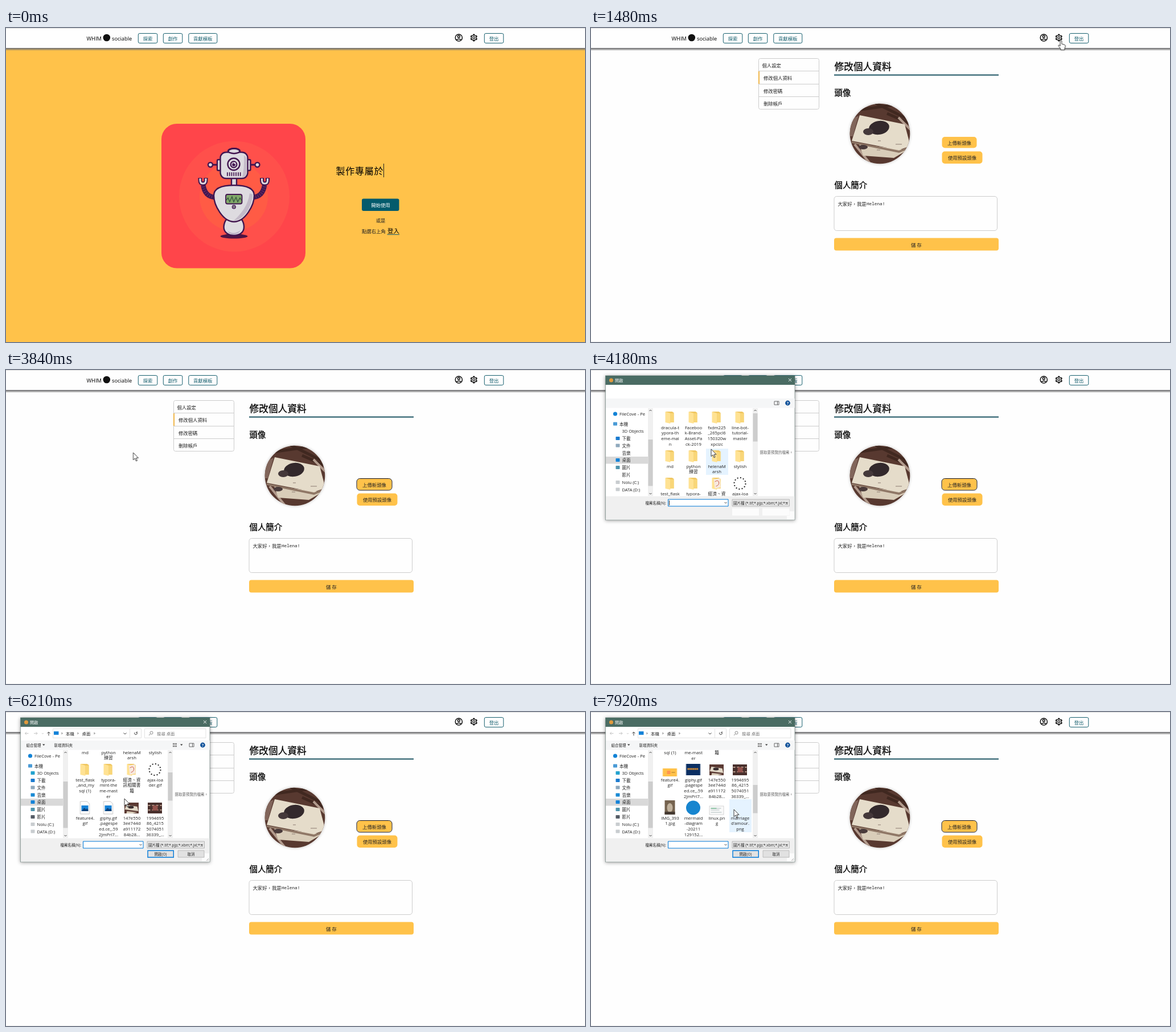
Animation, 1017 px wide and 551 px high, one loop 7990 ms. Source, as an HTML page:

```html
<!DOCTYPE html>
<html lang="zh-Hant">
<head>
<meta charset="utf-8">
<title>Profile settings</title>
<style>
html, body { margin: 0; width: 100%; height: 100%; overflow: hidden; background: #fefefe; }
svg { display: block; width: 100%; height: 100%; }
text { font: 8.4px "Open Sans", "Noto Sans CJK TC", "Noto Sans CJK", sans-serif; dominant-baseline: central; fill: #222; white-space: pre; }
.mid { text-anchor: middle; }
.head, .title { fill: #000; stroke: #000; stroke-width: .3; }
.head { font-size: 14.4px; }
.title { font-size: 16.7px; }
.teal { fill: #17606f; }
.nav rect { fill: none; stroke: #17606f; }
.gold { fill: #ffc24a; }
.line { fill: none; stroke: #ccc; }
.small { font-size: 6.5px; }
.file { font-size: 7.7px; text-anchor: middle; }
.ink { fill: none; stroke: #444; }
.bot { fill: #dedbe0; stroke: #42154f; stroke-width: 2.4; }
.shadow { filter: drop-shadow(0 1px 3px #0006); }

.step { animation: 7.99s step-end infinite; }
.flow { animation: 7.99s linear infinite; }
.home { animation-name: home; }
.card { animation-name: card; }
.settings { animation-name: settings; }
.key1 { animation-name: key1; }
.key2 { animation-name: key2; }
.key3 { animation-name: key3; }
.typing { animation-name: typing; }
.ring { animation-name: ring; }
.click { animation-name: click; mix-blend-mode: multiply; }
.dialog { animation-name: dialog; }
.late { animation-name: late; }
.blink { animation-name: blink; }
.list { animation-name: list; }
.thumb { animation-name: thumb; }
.hover { animation-name: hover; fill: #e5f3ff; }
.generic { animation-name: generic; }
.loaded { animation-name: loaded; }
.pointer { animation-name: pointer; }
.arrow { animation-name: arrow; }
.hand { animation-name: hand; }

@keyframes home { 0% { opacity: 1 } 18.52%, 100% { opacity: 0 } }
@keyframes settings { 0% { opacity: 0 } 18.52%, 100% { opacity: 1 } }
@keyframes card { 0% { fill: #ff454a } 7.75%, 100% { fill: #ff3f4b } }
@keyframes key1 { 0% { fill-opacity: 0 } 2.5%, 100% { fill-opacity: 1 } }
@keyframes key2 { 0% { fill-opacity: 0 } 8.76%, 100% { fill-opacity: 1 } }
@keyframes key3 { 0% { fill-opacity: 0 } 15.14%, 100% { fill-opacity: 1 } }
@keyframes typing {
  0% { transform: none; opacity: 1 }
  2.5% { transform: translateX(16.75px); opacity: 1 }
  5.88% { transform: translateX(16.75px); opacity: 0 }
  10.88% { transform: translateX(33.5px); opacity: 1 }
  15.14% { transform: translateX(50.25px); opacity: 1 }
  16.77%, 100% { opacity: 0 }
}
@keyframes click { 0% { opacity: 0 } 15.14% { opacity: 1 } 18.52%, 100% { opacity: 0 } }
@keyframes ring { 0% { opacity: 0 } 33.91%, 100% { opacity: 1 } }
@keyframes dialog { 0%, 49.8% { opacity: 0 } 51.5%, 100% { opacity: 1 } }
@keyframes late { 0% { opacity: 0 } 53.2%, 100% { opacity: 1 } }
@keyframes blink {
  0% { opacity: 0 } 52.31% { opacity: 1 } 58.94% { opacity: 0 } 65.7% { opacity: 1 } 72.59% { opacity: 0 }
  79.09% { opacity: 1 } 85.73% { opacity: 0 } 92.61% { opacity: 1 } 99.12%, 100% { opacity: 0 }
}
@keyframes list {
  0% { transform: none } 68.46% { transform: translateY(-32px) }
  77.72% { transform: translateY(-98px) } 95.11%, 100% { transform: translateY(-165px) }
}
@keyframes thumb {
  0% { transform: none } 68.46% { transform: translateY(10px) }
  77.72% { transform: translateY(30px) } 95.11%, 100% { transform: translateY(52px) }
}
@keyframes hover {
  0% { x: 202px; y: 138px; height: 46px; opacity: 0 }
  51% { x: 202px; y: 138px; height: 46px; opacity: 1 }
  53.5% { x: 202px; y: 70px; height: 66px; opacity: 1 }
  57.7% { opacity: 0 }
  61.8% { x: 202px; y: 70px; height: 66px; opacity: 1 }
  64.5% { x: 202px; y: 138px; height: 46px; opacity: 1 }
  68.46% { opacity: 0 }
  85.9% { x: 202px; y: 154px; height: 67px; opacity: 1 }
  88.5% { x: 243px; y: 154px; height: 67px; opacity: 1 }
  95.11%, 100% { x: 243px; y: 153px; height: 58px; opacity: 1 }
}
@keyframes generic { 0% { opacity: 1 } 79.09%, 100% { opacity: 0 } }
@keyframes loaded { 0% { opacity: 0 } 79.09%, 100% { opacity: 1 } }
@keyframes pointer {
  0%, .87% { transform: translate(901px, 474px); animation-timing-function: ease-in-out }
  5.88%, 7.75% { transform: translate(818px, 128px); animation-timing-function: ease-in-out }
  11.01% { transform: translate(825.5px, 22px); animation-timing-function: step-end }
  27.78% { transform: translate(820.5px, 38px); animation-timing-function: ease-out }
  32.2% { transform: translate(680px, 218px) }
  33.91%, 38.17% { transform: translate(646px, 206px); animation-timing-function: ease-in }
  42.5% { transform: translate(480px, 225px); animation-timing-function: ease-out }
  47% { transform: translate(220px, 140px) }
  48.06%, 49.81% { transform: translate(223.5px, 145px) }
  52.31% { transform: translate(211px, 139px) }
  59.57%, 60.45% { transform: translate(214px, 43px); animation-timing-function: ease-in-out }
  65.7%, 85.73% { transform: translate(208px, 152px); animation-timing-function: ease-out }
  89.36%, 100% { transform: translate(251px, 171px) }
}
@keyframes arrow {
  0% { opacity: 0 } .87% { opacity: 1 } 10.8% { opacity: 0 } 28.6% { opacity: 1 }
  32.2% { opacity: 0 } 38.9%, 100% { opacity: 1 }
}
@keyframes hand {
  0% { opacity: 0 } 10.8% { opacity: 1 } 28.6% { opacity: 0 } 32.2% { opacity: 1 } 38.9%, 100% { opacity: 0 }
}
</style>
</head>
<body>
<svg viewBox="0 0 1017 551" xmlns="http://www.w3.org/2000/svg">
  <defs>
    <linearGradient id="drop" x2="0" y2="1">
      <stop stop-color="#6c6c70"/><stop offset=".45" stop-color="#777" stop-opacity=".75"/><stop offset="1" stop-color="#777" stop-opacity="0"/>
    </linearGradient>
    <clipPath id="round"><circle cx="507.5" cy="185.5" r="52.8"/></clipPath>
    <clipPath id="pane"><rect x="109" y="67" width="175" height="154"/></clipPath>
    <g id="folder">
      <path d="M-7-10H4L7-8V9H-7Z" fill="#f0c762"/>
      <path d="M-8-10L1-7V11L-8 9Z" fill="#ffe293"/>
      <path d="M1-7H7V9H1Z" fill="#f9d678"/>
    </g>
    <g id="redFolder">
      <use href="#folder"/><path d="M-5-7L6-9L7 7L-3 9Z" fill="#f7e9df"/>
      <path d="M-3-3Q3-7 4-2T-1 5" fill="none" stroke="#d0604e"/>
    </g>
    <circle id="dots" r="10" fill="none" stroke="#222" stroke-width="2" stroke-dasharray="2 3.24"/>
    <g id="picture">
      <path d="M-8-11H4L8-7V11H-8Z" fill="#fff" stroke="#aaa" stroke-width=".7"/>
      <rect x="-6" y="-4" width="12" height="10" fill="#1683d8"/><path d="M-6 6L-1 0L2 3L4 1L6 4V6Z" fill="#0b3f78"/>
    </g>
    <g id="orange"><rect x="-12.5" y="-2" width="25" height="14" class="gold"/><rect x="-5" y="2" width="6" height="6" fill="#ff9550"/><path d="M3 5H9" stroke="#a9782b"/></g>
    <g id="navy"><rect x="-12.5" y="-10" width="25" height="20" fill="#0b2f63"/><path d="M-10-1H9" stroke="#e69533" stroke-width="3" stroke-dasharray="2.5 .7"/></g>
    <g id="book"><rect x="-12.5" y="-9" width="25" height="19" fill="#5b3a33"/><path d="M-9-5L10-2L12 6L-12 3Z" fill="#e2d9c8"/><ellipse cx="-1" cy="-1" rx="5" ry="2.5" fill="#372c2e"/><path d="M-8 6L10 8L2 10H-9Z" fill="#d7ccb9"/></g>
    <g id="shelf"><rect x="-12.5" y="-9" width="25" height="19" fill="#49302d"/><path d="M-12-4H12M-12 4H12" stroke="#b89c8c" stroke-width="2" stroke-dasharray="4 3"/><rect x="-4" y="-4" width="9" height="9" fill="#93524c"/></g>
    <g id="tall"><rect x="-9" y="-13" width="18" height="25" fill="#75634f"/><ellipse cy="0" rx="5" ry="8" fill="#c1b29d"/><path d="M-9 7H9V12H-9Z" fill="#453a32"/></g>
    <circle id="disc" r="12.5" fill="#1785cf"/>
    <g id="sheet"><rect x="-12.5" y="-3" width="25" height="15" fill="#fafafa" stroke="#bbb" stroke-width=".6"/><path d="M-10 1H8M-10 4H5M-10 8H9" stroke="#9aa" stroke-width=".8"/><path d="M-10 1H0" stroke="#49a86f"/></g>
    <g id="none"/>
    <g id="arm">
      <path d="M366 297Q349 295 346.5 276" fill="none" stroke="#42154f" stroke-width="8.5"/>
      <path d="M366 297Q349 295 346.5 276" fill="none" stroke="#673770" stroke-width="6" stroke-dasharray="1 3"/>
      <path d="M341 263V267Q341 273 346 273T351 267V263" fill="none" stroke="#42154f" stroke-width="7"/>
      <path d="M341 264V267Q341 273 346 273T351 267V264" fill="none" stroke="#dedbe0" stroke-width="3"/>
      <path d="M363 240H371" stroke="#42154f" stroke-width="3"/>
      <circle class="bot" cx="359" cy="240" r="4"/>
      <rect class="bot" x="371" y="231" width="6" height="19" rx="2"/>
    </g>
  </defs>

  <rect width="1017" height="551" fill="#fefefe"/>
  <path d="M0 550.5H1017" stroke="#f1f1f1"/>

  <g class="step home">
    <rect width="1017" height="551" class="gold"/>
    <rect class="step card" x="273" y="168" width="253" height="253.5" rx="27"/>
    <circle cx="401" cy="295.5" r="97" fill="#ff504b"/>
    <circle cx="400" cy="296" r="60" fill="#ff5b45"/>
    <ellipse cx="400.5" cy="365.5" rx="24" ry="4" fill="#4d1443"/>
    <use href="#arm"/><use href="#arm" transform="matrix(-1 0 0 1 800.5 0)"/>
    <path class="bot" d="M387 336H414Q418 342 418 349C418 359 410 364 400.5 364S382.5 359 382.5 349Q383 341 387 336Z"/>
    <path d="M389 356Q400 364 412 355Q408 362 400 362T389 356Z" fill="#b9aec4"/>
    <rect class="bot" x="396" y="262" width="9" height="15"/>
    <path class="bot" d="M400.5 276C424 276 436 282 436 294C436 311 420 340 400.5 340S365 311 365 294C365 282 377 276 400.5 276Z"/>
    <path d="M433 292C433 312 418 337 400 338C413 326 425 312 428 290Z" fill="#c4bac9"/>
    <ellipse class="bot" cx="400.5" cy="216" rx="10.5" ry="4.7"/>
    <rect class="bot" x="376.5" y="218" width="48" height="46" rx="10"/>
    <path d="M418 224Q422 225 422 231V255Q422 261 415 262Q419 245 418 224Z" fill="#c4bac9"/>
    <ellipse class="bot" cx="400.5" cy="216" rx="10" ry="4.2"/>
    <circle class="bot" cx="400" cy="239" r="10.5"/>
    <circle cx="400" cy="239.5" r="5.5" fill="#b3a5bd" stroke="#42154f" stroke-width="2"/>
    <circle cx="400" cy="240" r="2.5" fill="#42154f"/><circle cx="402" cy="237" r="1.2" fill="#fff"/>
    <path d="M388 256.5H413" stroke="#42154f" stroke-width="6.5" stroke-dasharray="1.7 2.1"/>
    <rect x="386" y="292" width="28.5" height="16.5" rx="3" fill="#80a868" stroke="#42154f" stroke-width="1.8"/>
    <path d="M387 302L390 298L393 305L397 296L400 305L404 297L407 305L411 298L414 303" fill="none" stroke="#35533f" stroke-width="1.3"/>
    <circle cx="400.3" cy="314" r="2.8" fill="#dedbe0" stroke="#42154f" stroke-width="1.5"/><circle cx="400.3" cy="314" r="1"/>

    <text class="title" x="579.5" y="251" style="font-size:16px;letter-spacing:.75px;stroke:none">製作專屬於<tspan class="step key1">你</tspan><tspan class="step key2">的</tspan><tspan class="step key3">迷</tspan></text>
    <path class="step typing" d="M663.5 238V262" stroke="#222"/>
    <rect x="625" y="299.5" width="65.5" height="21.5" rx="3" fill="#045b6c"/>
    <text class="mid" x="658" y="310" style="fill:#fff">開始使用</text>
    <text class="mid" x="658" y="337.5">或是</text>
    <text x="625" y="356.5">點選右上角</text>
    <text x="670" y="355.5" style="font-size:10.5px;font-weight:500;fill:#000">登入</text>
    <path d="M669.5 362.5H691" stroke="#17606f"/>
  </g>

  <g class="step settings">
    <rect class="line" x="294.5" y="53.5" width="106" height="89" rx="3"/>
    <path class="line" d="M294.5 75.5H400.5M294.5 98.5H400.5M294.5 120.5H400.5"/>
    <path d="M295 76V98" stroke="#f0b84c" stroke-width="2"/>
    <text x="300.5" y="65" style="font-weight:500">個人設定</text>
    <text x="303" y="87.5">修改個人資料</text><text x="303" y="110">修改密碼</text><text x="303" y="132">刪除帳戶</text>
    <text class="title" x="427.5" y="67.5">修改個人資料</text>
    <path d="M427 82.5H716" stroke="#1c5463" stroke-width="2.2"/>
    <text class="head" x="427.5" y="113.5">頭像</text>
    <text class="head" x="427.5" y="275">個人簡介</text>
    <circle cx="507.5" cy="185.5" r="53.5" fill="#e9e6e4" style="filter:drop-shadow(0 0 2px #0003)"/>
    <g clip-path="url(#round)">
      <rect x="454" y="132" width="107" height="107" fill="#583930"/>
      <path d="M454 146L545 133M500 132L561 162M520 150L561 168" stroke="#402820" stroke-width="5"/>
      <path d="M454 161L470 154L460 190H454Z" fill="#81655a"/>
      <path d="M454 208L480 240M463 204L492 240M540 157L561 178" stroke="#b29b8d" stroke-width="4"/>
      <path d="M471 204L556 214L532 228L478 224Z" fill="#d9cdb9"/>
      <path d="M472 153L551 169L561 207L541 214L458 198Z" fill="#e5dcca"/>
      <path d="M458 199L541 215L561 207V211L541 219L458 202Z" fill="#8f7766"/>
      <ellipse cx="506" cy="175" rx="18" ry="12" fill="#33292c" transform="rotate(-10 506 175)"/>
      <ellipse cx="487" cy="182" rx="9" ry="6" fill="#44383a"/>
      <ellipse cx="478" cy="209" rx="8" ry="4" fill="#4a3b3b"/>
      <path d="M504 198H509M535 204H546M502 214H508" stroke="#8b7b70"/>
    </g>
    <rect class="gold" x="616.5" y="191" width="61" height="19.5" rx="5"/>
    <rect class="step ring" x="616" y="190.5" width="62" height="20.5" rx="5.5" fill="none" stroke="#15141a"/>
    <text class="mid" x="647" y="201">上傳新頭像</text>
    <rect class="gold" x="616.5" y="216.5" width="71" height="21.5" rx="5"/>
    <text class="mid" x="652" y="227.5">使用預設頭像</text>
    <rect class="line" x="427" y="295.5" width="286.5" height="60" rx="4.5"/>
    <text x="433.5" y="308">大家好，我是</text>
    <text x="484" y="308" style="font:7.7px 'Noto Sans Mono',monospace">Helena!</text>
    <rect class="gold" x="427" y="368.5" width="289" height="22" rx="4"/>
    <text class="mid" x="571.5" y="380">儲 存</text>
  </g>

  <g class="nav">
    <path d="M0 35H1017V40H0Z" fill="url(#drop)"/>
    <path d="M0 0H1017V35H0Z" fill="#fefefe"/><path d="M0 .5H1017" stroke="#dedede"/>
    <text x="141.5" y="18" style="font-size:9.3px;fill:#000">WHIM</text>
    <circle cx="176.8" cy="17" r="6.3" fill="#111"/>
    <text x="186" y="18" style="font-size:9.3px;fill:#000">sociable</text>
    <g id="links"></g>
    <g fill="none" stroke="#111" stroke-width="1.5">
      <circle cx="795.3" cy="17" r="6.1"/><circle cx="795.3" cy="15" r="1.9"/><path d="M791 21Q795.3 17.5 799.6 21"/>
      <circle cx="821.8" cy="17" r="4.5"/><circle cx="821.8" cy="17" r="1.9" stroke-width="1.2"/>
      <circle cx="821.8" cy="17" r="5.7" stroke-width="1.6" pathLength="12" stroke-dasharray="1" stroke-dashoffset="-.5"/>
    </g>
  </g>

  <g class="flow dialog">
    <rect class="shadow" x="25.5" y="10" width="332.5" height="253" fill="#fff" stroke="#71857f" stroke-width=".7"/>
    <path d="M25.5 10H358V26H25.5Z" fill="#4a6c63"/>
    <circle cx="35.5" cy="18" r="3.5" fill="#e19a3d"/>
    <text x="42" y="18" style="font-size:7.2px;fill:#fff">開啟</text>
    <path d="M347 15L352 20M352 15L347 20" stroke="#fff"/>
    <path d="M26 50H358V66.5H26Z" fill="#f5f6f7"/>
    <path d="M322 55H330V61H322ZM327.5 55V61" class="ink" stroke-width=".8"/>
    <circle cx="345.5" cy="58" r="4.4" fill="#14549b"/>
    <text class="mid small" x="345.5" y="58" style="fill:#fff;font-weight:700">?</text>
    <g class="step late">
      <path class="line" d="M82.5 29.5H237.5V45.5H82.5ZM217.5 29.5V45.5M243.5 29.5H351V45.5H243.5Z" style="stroke:#e3e3e3"/>
      <path class="ink" d="M39.5 37.5H33.5L36 35M33.5 37.5L36 40M49 37.5H55L52.5 35M55 37.5L52.5 40M63 37L64.5 38.5L66 37" style="stroke:#c5c5c5"/>
      <path class="ink" d="M75 41.5V35L72.5 37.5M75 35L77.5 37.5M97.5 36L99 37.5L97.5 39M125.5 36L127 37.5L125.5 39M154.5 36L156 37.5L154.5 39M206.5 36.5L209 39L211.5 36.5"/>
      <path d="M84 34H92.5V40H84Z" fill="#1583d8"/>
      <path class="ink" d="M226 36A2.4 2.4 0 1 0 230 36M230 34V36.5H228"/>
      <path class="ink" d="M251 41L253.5 38.5" style="stroke:#888"/><circle class="ink" cx="255.5" cy="36.5" r="2.5" style="stroke:#888"/>
      <text x="105" y="37.5" style="font-size:7.4px">本機</text><text x="133.5" y="37.5" style="font-size:7.4px">桌面</text>
      <text x="265" y="37.5" style="font-size:7.4px;fill:#777">搜尋 桌面</text>
      <text class="small" x="35.5" y="58">組合管理</text><text class="small" x="84.5" y="58">新增資料夾</text>
      <path d="M64 56.5H68.5L66.2 59ZM306 56.5H310.5L308.2 59Z" fill="#333"/>
      <path d="M293 56H300M293 60H300" stroke="#777" stroke-width="2.5" stroke-dasharray="2 .6"/>
    </g>

    <path d="M26 152H100V164.5H26Z" fill="#d9d9d9"/>
    <g id="places"></g>
    <path d="M100 67H109V221H100ZM284 67H293V221H284Z" fill="#f0f0f0"/>
    <path d="M100.5 122H108.5V203.5H100.5Z" fill="#cdcdcd"/>
    <path class="step thumb" d="M284.5 76H292.5V125.5H284.5Z" fill="#cdcdcd"/>
    <path class="ink" d="M102.5 72L104.5 70L106.5 72M102.5 216L104.5 218L106.5 216M286.5 72L288.5 70L290.5 72M286.5 216L288.5 218L290.5 216"/>
    <text class="small" x="296.5" y="144" style="fill:#666">選取要預覽的檔案。</text>
    <g clip-path="url(#pane)">
      <rect class="step hover" width="39"/>
      <g id="files" class="step list"></g>
    </g>

    <path d="M26 221.5H357.5V262.5H26Z" fill="#f0f0f0"/>
    <text class="small" x="132" y="233" text-anchor="end">檔案名稱(N):</text>
    <path d="M135.5 227H241V239H135.5Z" fill="#fff" stroke="#0078d7"/>
    <path class="step blink" d="M137.5 229V237.5" stroke="#111" stroke-width=".9"/>
    <path d="M248 227H348.5V239H248Z" fill="#e5e5e5" stroke="#aaa" stroke-width=".8"/>
    <text class="small" x="250" y="233">圖片檔 (*.tif;*.pjp;*.xbm;*.jxl;*.s</text>
    <path class="ink" d="M234.5 232L236.5 234L238.5 232M341.5 232L343.5 234L345.5 232"/>
    <path d="M248 242.5H295V255.5H248ZM301 242.5H348.5V255.5H301ZM344 256H357V262H344ZM349 248H357V262H349Z" fill="#fcfcfc"/>
    <g class="step late">
      <path d="M249 243.2H294.3V255H249Z" fill="#e1e1e1" stroke="#0078d7" stroke-width="1.4"/>
      <path d="M302 243H348V255H302Z" fill="#e1e1e1" stroke="#adadad" stroke-width=".8"/>
      <text class="mid small" x="271.5" y="249">開啟(O)</text><text class="mid small" x="325" y="249">取消</text>
      <path d="M352 261L356 257M354.5 261L356 259.5" stroke="#999" stroke-width=".8"/>
    </g>
  </g>

  <circle class="step click" cx="826.5" cy="21.2" r="9.3" fill="#fff04a"/>
  <g class="flow pointer" fill="#fff" stroke="#222" stroke-width=".9" stroke-linejoin="round">
    <path class="step arrow" d="M0 0V12.8L3 10L5 14.8L7 14L5 9.3H9Z"/>
    <path class="step hand" d="M-1.4 .8Q0-1 1.4 .8V6L6 7.3Q8 8 7.8 10L6.5 14V16.5H-.5V14.5L-4.6 9.4Q-4.6 7.2-2.6 8.2L-1.4 9.6Z"/>
  </g>
</svg>
<script>
const $ = id => document.getElementById(id);

function add(parent, tag, attrs, content = '') {
  const node = document.createElementNS('http://www.w3.org/2000/svg', tag);
  for (const key in attrs) node.setAttribute(key, attrs[key]);
  node.textContent = content;
  return parent.appendChild(node);
}

for (const [x, width, label] of [[232, 34, '探索'], [276, 34, '創作'], [320.5, 50.5, '貢獻模板'], [840, 34, '登出']]) {
  add($('links'), 'rect', { x: x + .3, y: 9.5, width: width - .5, height: 17, rx: 2.5 });
  add($('links'), 'text', { x: x + width / 2, y: 18.3, class: 'mid teal' }, label);
}

// Sidebar: label, centre y, indent, icon colour, whether the icon arrives late
const places = [
  ['本機', 94.5, 50, '#4a9bd6'], ['3D Objects', 107, 54.5, '#24a3cf', true],
  ['下載', 120, 54.5, '#1a7bd0'], ['文件', 132.5, 54.5, '#8fa9bd'],
  ['音樂', 145.5, 54.5, '#1a8ad4', true], ['桌面', 158, 54.5, '#1583d8'],
  ['圖片', 171, 54.5, '#4f94ad'], ['影片', 184, 54.5, '#555c66', true],
  ['Nolu (C:)', 197, 54.5, '#c9cdd0'], ['DATA (D:)', 209.5, 54.5, '#c9cdd0']
];
add($('places'), 'circle', { cx: 42.5, cy: 77, r: 3.6, fill: '#1283d6' });
add($('places'), 'text', { x: 50, y: 77, style: 'font-size:7.7px' }, 'FileCove - Pe');
for (const [label, y, x, fill, late] of places) {
  add($('places'), 'rect', { x: x - 11, y: y - 3, width: 7, height: 6, rx: .8, fill, class: late ? 'step late' : '' });
  add($('places'), 'text', { x, y, style: 'font-size:7.5px' }, label);
}

// Rows of files: icon centre y, then "icon|line|line..." for each column
const rows = [
  [83, 'folder|dracula-t|ypora-th|eme-mai|n', 'folder|Faceboo|k-Brand-|Asset-Pa|ck-2019',
    'folder|fxdm225|_265pcl6|150320w|xpcizc', 'folder|line-bot-|tutorial-|master'],
  [151, 'folder|md', 'folder|python|練習', 'folder|helenaM|arsh', 'folder|stylish'],
  [199, 'folder|test_flask|_and_my|sql (1)', 'folder|typora-|mint-the|me-mast|er',
    'redFolder|經濟、資|訊相關書|籍', 'dots|ajax-loa|der.gif'],
  [266, 'orange|feature4.|gif', 'navy|giphy.gif|.pagespe|ed.ce_.59|2JmPrl7...',
    'book|147e550|3ee744d|a911172|84b28...', 'shelf|1994695|86_4215|5074051|36339_...'],
  [333, 'tall|IMG_393|1.jpg', 'disc|mermaid|-diagram|-20211|129152...', 'sheet|linux.pn|g', "none|marriage|d'amour.|png"]
];
const slow = ['orange', 'navy'];
for (const [y, ...items] of rows) {
  items.forEach((item, col) => {
    const [icon, ...lines] = item.split('|');
    const x = 139 + col * 41;
    const place = { x: x - .5, y };
    const late = slow.includes(icon);
    if (late) add($('files'), 'use', { ...place, href: '#picture', class: 'step generic' });
    add($('files'), 'use', { ...place, href: '#' + icon, class: late ? 'step loaded' : '' });
    lines.forEach((line, i) => add($('files'), 'text', { x, y: y + 17.7 + i * 9.7, class: 'file' }, line));
  });
}
</script>
</body>
</html>
```
